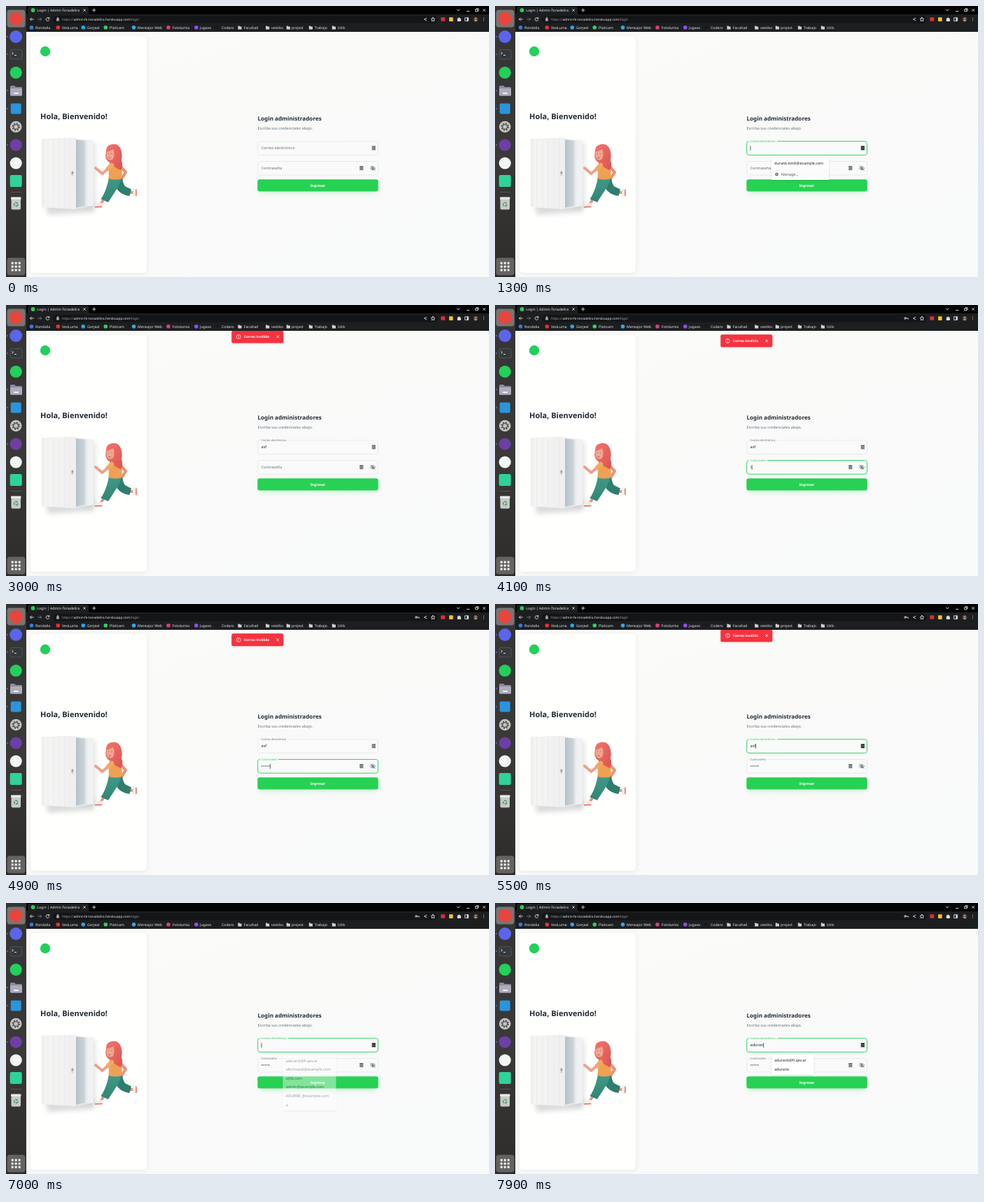
Animation of 690x388 px, one loop 8 s. Source, as an HTML page:

```html
<!DOCTYPE html>
<html lang="es">
<head>
<meta charset="utf-8">
<title>Login</title>
<style>
html, body { margin: 0; width: 100%; height: 100%; overflow: hidden; background: #f9faf9; }
svg { display: block; width: 100%; height: 100%; }
text { font-family: "Noto Sans", "Open Sans", sans-serif; text-rendering: geometricPrecision; white-space: pre; }
.line { fill: none; stroke: #dcdde0; stroke-width: .9; stroke-linecap: round; stroke-linejoin: round; }
.limb { fill: none; stroke-linecap: round; stroke-linejoin: round; }
</style>
</head>
<body>
<svg viewBox="0 0 690 388" xmlns="http://www.w3.org/2000/svg">
  <defs>
    <linearGradient id="pageFill" x2=".6" y2="1"><stop stop-color="#fbfcf8"/><stop offset="1" stop-color="#f8f9f9"/></linearGradient>
    <linearGradient id="dockFill" x2="0" y2="1">
      <stop stop-color="#343434"/><stop offset=".55" stop-color="#3a3938"/><stop offset="1" stop-color="#2d2c2b"/>
    </linearGradient>
    <linearGradient id="leaf"><stop stop-color="#ebebeb"/><stop offset=".12" stop-color="#f5f5f4"/><stop offset="1" stop-color="#efefef"/></linearGradient>
    <linearGradient id="gap"><stop stop-color="#b3c0c8"/><stop offset="1" stop-color="#d3dbe0"/></linearGradient>
    <linearGradient id="hair" x2="1" y2="1"><stop stop-color="#f2766d"/><stop offset="1" stop-color="#dc5250"/></linearGradient>
    <linearGradient id="cloth" x2="0" y2="1"><stop stop-color="#3f9a87"/><stop offset="1" stop-color="#338573"/></linearGradient>
    <filter id="soft" x="-40%" y="-40%" width="180%" height="200%"><feGaussianBlur stdDeviation="3"/></filter>
    <filter id="drop" x="-20%" y="-20%" width="140%" height="160%"><feDropShadow dx="0" dy=".8" stdDeviation="1.2" flood-opacity=".17"/></filter>
    <clipPath id="page"><rect x="29" y="37" width="661" height="351"/></clipPath>
  </defs>

  <rect width="690" height="388" fill="url(#pageFill)"/>

  <!-- welcome card -->
  <rect x="35" y="44" width="166" height="339" rx="5" fill="#9aa5a0" opacity=".2" filter="url(#soft)"/>
  <rect x="35" y="43" width="166" height="339" rx="5" fill="#fffffd"/>
  <circle cx="56" cy="65" r="7.2" fill="#22d05a"/>
  <text x="49" y="162" font-size="11" font-weight="700" fill="#212b36">Hola, Bienvenido!</text>

  <!-- door -->
  <path d="M56 284L126 280V295L60 299Z" fill="#8e9499" opacity=".32" filter="url(#soft)"/>
  <path d="M113 196H128V288H113Z" fill="#8e9499" opacity=".25" filter="url(#soft)"/>
  <path d="M99 190L125 192.500V286L99 290Z" fill="#f0f1f2"/>
  <path d="M99 191L116 193V286L99 289Z" fill="url(#gap)"/>
  <path d="M113 193L116 193V286L113 287Z" fill="#e3e8ea"/>
  <path d="M51 191Q51 190 52 190L98 188.500Q100 188.500 100 190V289Q100 291 98 291L52 288Q51 288 51 287Z" fill="url(#leaf)"/>
  <path d="M60 190V288M68 190V288.500M76 190V289M84 189.500V289.500M91.500 189V290" stroke="#e5e6e7" stroke-width=".7"/>
  <rect x="93.200" y="235.500" width="3.200" height="8" rx="1.500" fill="#d3d5d8"/>
  <circle cx="95" cy="238.800" r="1.500" fill="#949ba1"/>

  <!-- runner -->
  <g class="limb">
    <path d="M163 229L171 238L166 246" stroke="#ea917b" stroke-width="4.200"/>
    <path d="M178 267L183 267" stroke="#ea917b" stroke-width="4"/>
    <path d="M183 263.500L183.500 271" stroke="#f4ece6" stroke-width="4"/>
    <path d="M186 263V271.500" stroke="#e3625c" stroke-width="1.400"/>
    <path d="M139 278L135 284" stroke="#ea917b" stroke-width="3.800"/>
    <path d="M136 284L130 285" stroke="#f4ece6" stroke-width="4.500"/>
    <path d="M127.500 287.700L137 287.500" stroke="#e3625c" stroke-width="1.400"/>
  </g>
  <path d="M155 246H166Q167 254 170 258L179 262.500L176.500 272Q166 271 159 263Z" fill="#2f7d6d"/>
  <path d="M147 245H165Q163 256 157 264L146 281L135.500 276.500Q144 264 147 245Z" fill="url(#cloth)"/>
  <path d="M148 224Q158 220 165 225L166 247Q156 250 146.500 247Z" fill="#efa053"/>
  <path d="M148 199Q158 195 163 203Q167 211 165 221Q168 229 164 235Q154 231 148 224Q140 220 143 208Q143 201 148 199Z" fill="url(#hair)"/>
  <path d="M144 209Q150 207 153 205Q156 212 153 219Q148 223 144.500 218Q142.500 213 144 209Z" fill="#f3a68f"/>
  <path d="M146 211.500h1M150.500 211.500h1M146.500 217q1.500 1 3 0" stroke="#6b3a3a" stroke-width=".7" fill="none"/>
  <g class="limb">
    <path d="M151 228L146 233" stroke="#f2a95f" stroke-width="6.500"/>
    <path d="M144.500 234L137.500 240L128 232" stroke="#f0a08a" stroke-width="4"/>
  </g>

  <!-- form -->
  <text x="359.500" y="164" font-size="8.100" font-weight="700" fill="#212b36">Login administradores</text>
  <text x="359.500" y="177" font-size="5.470" fill="#637381">Escriba sus credenciales abajo.</text>
  <g id="fields"></g>
  <g fill="none" stroke="#606b76" stroke-width=".8">
    <path d="M520.300 232.300Q524 227 527.700 232.300Q524 237.300 520.300 232.300Z"/>
    <circle cx="524" cy="232.300" r="1.200" fill="#606b76"/>
    <path d="M520.800 228.800L527.400 235.700"/>
  </g>
  <rect x="362" y="254" width="167" height="15" rx="3" fill="#22d05a" opacity=".17" filter="url(#soft)"/>
  <rect x="359.300" y="248.300" width="172.500" height="17.200" rx="3" fill="#27d153"/>
  <text x="445.500" y="258.700" font-size="5.100" font-weight="700" fill="#fff" text-anchor="middle">Ingresar</text>
  <g id="menus"></g>

  <!-- toast -->
  <g clip-path="url(#page)">
    <g id="toast">
      <rect x="322.300" y="42.300" width="74" height="18" rx="2.500" fill="#f5333f" filter="url(#drop)"/>
      <circle cx="332.300" cy="51.300" r="3" fill="none" stroke="#fff" stroke-width=".7"/>
      <path d="M332.300 49.500V51.700M332.300 52.500V53.100" stroke="#fff" stroke-width=".8"/>
      <text x="340" y="53.100" font-size="4.750" font-weight="700" fill="#fff">Correo inválido</text>
      <path d="M386.300 49.500l3.600 3.600m0-3.600l-3.600 3.600" stroke="#fff" stroke-width=".9"/>
    </g>
  </g>

  <!-- browser -->
  <rect x="28" width="662" height="37" fill="#1d1e20"/>
  <rect x="28" width="662" height="12" fill="#030303"/>
  <path d="M29 12Q31 12 31 9V3Q31 1 33 1H116Q118 1 118 3V9Q118 12 120 12Z" fill="#1d1e20"/>
  <circle cx="38.500" cy="6" r="2.900" fill="#22d05a"/>
  <text x="44.300" y="8" font-size="5.100" fill="#e8eaed">Login | Admin-Tonadelira</text>
  <path class="line" d="M110.700 4.600l2.800 2.800m0-2.800l-2.800 2.800M123.600 6h4.400M125.800 3.800v4.400M644.500 5l1.700 2l1.700-2M658.500 7.500h3.500M671 4.800h3v3h-3zM672 4.800v-1h3v3h-1M681.700 4.500l3 3m0-3l-3 3"/>
  <rect x="67" y="14" width="550" height="10.500" rx="5.200" fill="#141517"/>
  <path class="line" d="M39.500 19h-5m2-2l-2 2l2 2M61.600 17.700a2.400 2.400 0 1 0 .2 2.300M61.800 16.400v1.700h-1.700"/>
  <path class="line" d="M45.500 19h5m-2-2l2 2l-2 2" opacity=".45"/>
  <path d="M72.300 18.300h3.400v3h-3.400zM73 18.300v-1a1 1 0 0 1 2 0v1" fill="#a5a8ac" stroke="#a5a8ac" stroke-width=".5"/>
  <text x="80" y="21" font-size="4.760" fill="#9aa0a6"><tspan>https://</tspan><tspan fill="#e8eaed">admin-fe-tonadelira.herokuapp.com</tspan><tspan>/login</tspan></text>
  <g id="key" class="line"><circle cx="586" cy="19" r="1.300"/><path d="M587.400 19h2.800v1.400"/></g>
  <path class="line" d="M600.800 17.400l-3.300 1.600l3.300 1.800M610 16.300l.9 1.800l2 .3l-1.500 1.400l.4 2l-1.800-1l-1.800 1l.4-2l-1.500-1.400l2-.3z"/>
  <rect x="621.300" y="16.300" width="6" height="5.400" rx="1" fill="#d3313a"/>
  <rect x="633" y="16.300" width="5.600" height="5.600" rx=".6" fill="#f2c52e"/>
  <path d="M644.800 17.500h1.500a1 1 0 0 1 2 0h1.300v1.600a1 1 0 0 1 0 1.800v1.100h-4.800z" fill="#dcdde0"/>
  <path class="line" d="M656 16.800h4.600v4.600h-4.600z"/><path d="M658.400 16.800h2.200v4.600h-2.200z" fill="#dcdde0"/>
  <circle cx="671" cy="19" r="3.200" fill="#5c4a40"/>
  <circle cx="671" cy="18" r="1.200" fill="#b98f78"/><path d="M668.800 21.300q2.200-3.500 4.400 0q-2.200 1.800-4.400 0z" fill="#b98f78"/>
  <path d="M682.500 16.600v.8m0 1.200v.8m0 1.200v.8" stroke="#dcdde0" stroke-width="1"/>
  <g id="bookmarks"></g>

  <!-- dock -->
  <rect width="29" height="388" fill="url(#dockFill)"/>
  <rect x="1.500" y="5.500" width="26" height="25" rx="4" fill="#777674"/>
  <rect x="1.500" y="360.500" width="26" height="25" rx="4" fill="#646361"/>
  <g id="dock"></g>
  <rect x="6" y="62.500" width="17" height="13.500" rx="2" fill="#34393b" stroke="#666" stroke-width=".6"/>
  <path d="M8.500 66l2 1.700l-2 1.700M12 70.500h3" stroke="#eee" stroke-width=".9" fill="none"/>
  <path d="M6 115.500Q6 114 7.500 114H12L14 116H21.500Q23 116 23 117.500V127Q23 128.500 21.500 128.500H7.500Q6 128.500 6 127Z" fill="#8d8aa0"/>
  <rect x="6" y="118" width="17" height="10.500" rx="1.500" fill="#aeacbb"/><rect x="11" y="124" width="7" height="2" rx="1" fill="#f1f1f4"/>
  <circle cx="14.200" cy="173" r="8.300" fill="#c4c4c2"/>
  <circle cx="14.200" cy="173" r="4.700" fill="none" stroke="#555" stroke-width="2.200" stroke-dasharray="1.850"/>
  <circle cx="14.200" cy="173" r="3.400" fill="none" stroke="#555" stroke-width="1.300"/>
  <path d="M7 266.500H22" stroke="#666" stroke-width=".7"/>
  <rect x="7.500" y="274.500" width="13.500" height="17" rx="2" fill="#c7cac6"/>
  <rect x="7" y="273.500" width="14.500" height="3.500" rx="1.300" fill="#e8e9e6"/>
  <circle cx="14.200" cy="284" r="2.500" fill="none" stroke="#3f9b58" stroke-width="1.400" stroke-dasharray="4 1.200"/>
</svg>

<script>
const LOOP = 8000;
const $ = id => document.getElementById(id);
const clamp = v => Math.max(0, Math.min(1, v));
const ramp = (t, start, length) => clamp((t - start) / length);
const within = (t, spans) => spans.some(([a, b]) => t >= a && t < b);
const GREEN = '#2bcf60';

// [icon x, text x, label, icon colour]; folders have no colour
const bookmarks = [
  [36.5, 42, 'Rondalia', '#2f7de1'], [74.3, 80, 'VeoLuma', '#ed2f2f'],
  [110.3, 116, 'Gorjeal', '#2aa4ee'], [142.3, 148, 'Platicam', '#2fd065'],
  [182.6, 188, 'Mensajor Web', '#36a7e4'], [232, 237.7, 'Fotolumia', '#df3c82'],
  [271.8, 277, 'Jugavo', '#8f50f0'], [302, 308, 'Codaro', '#1a1a1a'],
  [334, 339.7, 'Facultad'], [373.7, 379, 'vestiko'], [403.3, 408, 'project'],
  [435.4, 440.8, 'Trabajo'], [468.4, 473.7, 'Utils']
];
$('bookmarks').innerHTML = bookmarks.map(([ix, x, label, color]) =>
  (color ? `<circle cx="${ix}" cy="30.800" r="2.800" fill="${color}"/>`
    : `<path d="M${ix - 2.6} 28.500h2l.8.900h2.400v4h-5.200z" fill="#cfd1d4"/>`) +
  `<text x="${x}" y="32.700" font-size="5.200" fill="#e3e5e8">${label}</text>`).join('');

const disc = (y, r, color) => `<circle cx="14.200" cy="${y}" r="${r}" fill="${color}"/>`;
const tile = (y, s, color) => `<rect x="${14.2 - s / 2}" y="${y - s / 2}" width="${s}" height="${s}" rx="2" fill="${color}"/>`;
let dock = disc(18, 9.5, '#e8453c') + disc(44, 9, '#5b65ea') + disc(95.3, 8.6, '#22d05a') +
  tile(147, 15, '#2a95dc') + disc(199, 8.6, '#6d3fa6') + disc(225, 8.6, '#f2f5f6') + tile(250.5, 17, '#2ed39a');
for (const y of [44, 69, 121, 147, 199]) dock += `<circle cx="2" cy="${y}" r=".9" fill="#6a74c8"/>`;
for (let i = 0; i < 9; i++)
  dock += `<rect x="${7.6 + i % 3 * 5}" y="${366.5 + Math.floor(i / 3) * 5}" width="3.200" height="3.200" rx="1" fill="#eee"/>`;
$('dock').innerHTML = dock;

// Text inputs with a floating label
function makeField(id, y, label, notch, iconX) {
  const bars = [0, 2.1, 4.2].map(d => `M${iconX - 2.6} ${y + 7.6 + d}h5.200`).join('');
  $('fields').insertAdjacentHTML('beforeend', `
    <rect id="${id}Box" x="359.700" y="${y}" width="171.800" height="19.700" rx="3" fill="#f9faf9"/>
    <rect id="${id}Notch" x="362.800" y="${y - 1}" height="2" fill="#f9faf9"/>
    <text id="${id}Label" font-size="5.550">${label}</text>
    <text id="${id}Text" x="364.500" y="${y + 11.7}" font-size="5.600" fill="#212b36"></text>
    <rect id="${id}Caret" y="${y + 6.6}" width=".7" height="6.800" fill="#212b36"/>
    <path id="${id}Icon" d="${bars}" stroke-width="1.600"/>`);
  return { id, y, notch };
}

const email = Object.assign(makeField('email', 193.7, 'Correo electrónico', 40.5, 525.3), {
  focus: [[400, 2800], [5050, LOOP]], taps: [400, 950, 5050], darkens: true,
  edits: [[0, ''], [1500, 'a'], [1700, 'as'], [1900, 'asf'], [5700, 'as'], [5800, 'a'], [5900, ''],
    [6500, 'a'], [6920, ''], [7500, 'a'], [7560, 'ad'], [7640, 'adu'], [7720, 'adur'], [7790, 'adura'], [7870, 'aduran']]
});
const pass = Object.assign(makeField('pass', 222.5, 'Contraseña', 26, 507.8), {
  focus: [[3350, 5050]], taps: [3350],
  edits: [0, 3950, 4200, 4300, 4400, 4520, 4650].map((time, n) => [time, '•'.repeat(n)])
});

function drawField(f, t) {
  const part = name => $(f.id + name);
  const focused = within(t, f.focus);
  const p = 1 - (1 - ramp(t, f.focus[0][0], 200)) ** 3;
  const [edited, value] = f.edits.filter(e => e[0] <= t).pop();
  part('Box').setAttribute('stroke', focused ? GREEN : '#d9dfe3');
  part('Box').setAttribute('stroke-width', focused ? .95 : .55);
  part('Notch').setAttribute('width', f.notch * p);
  part('Label').setAttribute('transform', `translate(364.5 ${f.y + 11.7 - 10.3 * p}) scale(${1 - .25 * p})`);
  part('Label').setAttribute('fill', focused ? GREEN : '#637381');
  part('Text').textContent = value;
  part('Icon').setAttribute('stroke', focused && f.darkens ? '#0b0b0b' : '#5c6268');
  const last = Math.max(edited, ...f.taps.filter(x => x <= t));
  part('Caret').setAttribute('visibility', focused && (t - last) % 1000 < 500 ? 'visible' : 'hidden');
  part('Caret').setAttribute('x', 364.6 + (value ? part('Text').getComputedTextLength() : 0));
}

// Autofill popups: spans are [open, close, fade out]
const menus = [
  { box: [395, 217, 82, 32], step: 16, spans: [[950, 1500, 150]], items: ['durank.emili@example.com'],
    extra: `<rect x="395" y="233" width="82" height="16" fill="#fafbfa"/>
      <circle cx="402.500" cy="241" r="2.300" fill="#666"/><path d="M401.500 241h2M402.500 240v2" stroke="#fff" stroke-width=".6"/>
      <text x="409" y="243" font-size="5.300" fill="#555">Manage...</text>` },
  { box: [395.5, 217.5, 76, 79.5], step: 12.6, spans: [[6500, 6920, 140], [7500, 7640, 1]],
    items: ['adurank@fi.qev.ar', 'albrimaral@example.com', 'a@b.com', 'admin@example.com', 'ADUR98_@example.com', 'a'] },
  { box: [395, 217, 60.5, 29], step: 13, spans: [[7640, LOOP, 1]], quick: true,
    items: ['adurank@fi.qev.ar', 'adurank'] }
];
$('menus').innerHTML = menus.map(({ box: [x, y, w, h], step, items, extra = '' }, n) =>
  `<g id="menu${n}"><rect x="${x}" y="${y}" width="${w}" height="${h}" rx="1" fill="#fff" filter="url(#drop)"/>${extra}` +
  items.map((s, i) => `<text x="${x + 4.2}" y="${y + 10 + i * step}" font-size="5.350" fill="#1c1c1c">${s}</text>`).join('') +
  '</g>').join('');

function drawMenus(t) {
  menus.forEach((m, n) => {
    const alpha = Math.max(...m.spans.map(([open, close, out]) =>
      Math.min(m.quick ? +(t >= open) : ramp(t, open, 120), 1 - ramp(t, close, out))));
    $('menu' + n).setAttribute('opacity', alpha);
  });
}

function draw(t) {
  drawField(email, t);
  drawField(pass, t);
  drawMenus(t);
  const shift = -30 * ((1 - ramp(t, 2907, 225)) ** 3 + ramp(t, 5413, 195) ** 2);
  $('toast').setAttribute('transform', `translate(0 ${shift})`);
  $('toast').setAttribute('visibility', within(t, [[2907, 5608]]) ? 'visible' : 'hidden');
  $('key').setAttribute('visibility', t >= 3950 ? 'visible' : 'hidden');
}

const begin = performance.now();
function tick() {
  draw((performance.now() - begin) % LOOP);
  requestAnimationFrame(tick);
}
tick();
</script>
</body>
</html>
```
